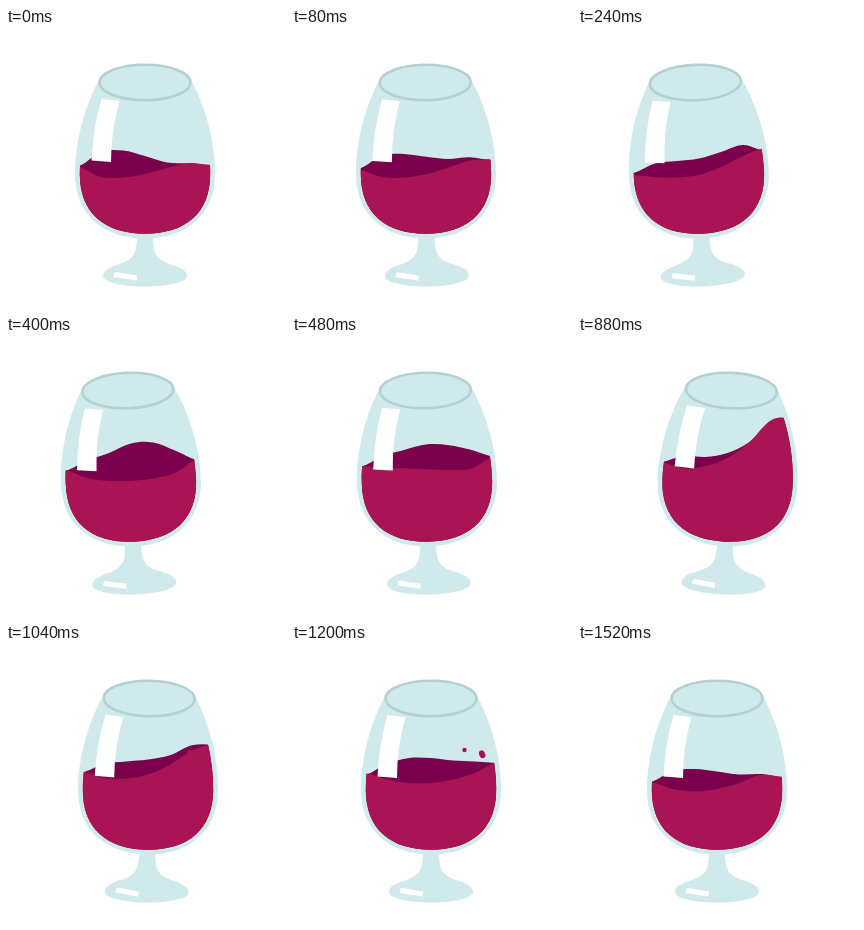
An HTML page with a canvas for the animation above (1.6 s loop, 280x280 px).

```html
<!DOCTYPE html>
<html lang="en">
<head>
<meta charset="utf-8">
<title>Swirling wine</title>
<style>
html, body { margin: 0; width: 100%; height: 100%; overflow: hidden; background: #fff; }
canvas { display: block; width: 100vw; height: 100vh; }
</style>
</head>
<body>
<canvas id="stage"></canvas>
<script>
const canvas = document.getElementById('stage');
const ctx = canvas.getContext('2d');
const SIZE = 280, LOOP = 1600, STEP = 80;
const GLASS = '#d0eaeb', RIM = '#b4d1d2', WINE = '#a91554', DARK = '#7a004c';
const PIVOT_Y = 148, GLASS_HEIGHT = 193;

// [time, sideways shift of the bowl, lean of rim against foot]
const SWAY = [
  [0, 0, 0], [80, -5, -1.5], [160, -12, -5], [240, -18, -7.5], [320, -24, -8.5],
  [400, -14, -6.5], [480, -4, -3.5], [560, 6, 0], [640, 11, 3.5], [720, 15, 7],
  [800, 17, 9], [880, 10.5, 8], [960, 6, 5], [1040, 3, 2.5], [1120, 1, 0.7],
  [1200, 0, 0], [1600, 0, 0]
];

// [time, seven heights of the far edge, seven heights of the near edge]
const WAVES = [
  [0, 138, 124, 122.5, 128, 134.5, 135.5, 137, 139, 149, 149.5, 146, 140, 135, 137],
  [240, 145, 135.5, 133, 130.5, 124, 117, 123, 147, 149, 149.5, 147, 139, 128, 120],
  [400, 135, 124.5, 117, 107.5, 106.5, 114.5, 124, 134, 142, 145, 145, 142.5, 137, 123],
  [640, 122, 111, 107, 110, 114.5, 112.5, 114, 122, 111, 107, 110, 117, 124, 117],
  [880, 126, 120, 121, 117, 106, 85, 82, 126, 132.5, 130, 122, 106, 84, 82],
  [1200, 131, 120, 114, 114, 116.5, 117.5, 119, 129, 135.5, 139, 139, 135.5, 129, 118],
  [1520, 138, 127, 125, 127.5, 130.5, 130, 133, 138, 145, 147.5, 145, 139, 131, 133]
];
WAVES.push([LOOP, ...WAVES[0].slice(1)]);

function sample(keys, t) {
  let i = 1;
  while (i < keys.length - 1 && keys[i][0] < t) i++;
  const a = keys[i - 1], b = keys[i];
  const k = (t - a[0]) / (b[0] - a[0]);
  return a.slice(1).map((v, n) => v + (b[n + 1] - v) * k);
}

function fill(color, trace) {
  ctx.beginPath();
  trace();
  ctx.fillStyle = color;
  ctx.fill();
}

function bowl(inset) {
  const w = 70 - inset, top = 46 - inset, bottom = 210.5 - inset;
  ctx.moveTo(-top, 52);
  ctx.bezierCurveTo(-top - 14, 78, -w, 112, -w, 146);
  ctx.bezierCurveTo(-w, 186, -42 + inset / 2, bottom, 0, bottom);
  ctx.bezierCurveTo(42 - inset / 2, bottom, w, 186, w, 146);
  ctx.bezierCurveTo(w, 112, top + 14, 78, top, 52);
  ctx.closePath();
}

function foot() {
  ctx.moveTo(-8, 206);
  ctx.bezierCurveTo(-8, 226, -11, 231, -25, 236);
  ctx.bezierCurveTo(-36, 239, -42, 243, -42, 248);
  ctx.bezierCurveTo(-42, 254, -24, 258.5, 0, 258.5);
  ctx.bezierCurveTo(24, 258.5, 42, 254, 42, 248);
  ctx.bezierCurveTo(42, 243, 36, 239, 25, 236);
  ctx.bezierCurveTo(11, 231, 8, 226, 8, 206);
  ctx.closePath();
}

// Smooth curve through evenly spaced heights, closed below the bowl.
function surface(heights) {
  const gap = 22, last = heights.length - 1;
  const y = i => heights[Math.max(0, Math.min(last, i))];
  const x = i => (i - last / 2) * gap;
  ctx.moveTo(x(0) - 8, 230);
  ctx.lineTo(x(0) - 8, y(0) + 3);
  ctx.lineTo(x(0), y(0));
  for (let i = 0; i < last; i++) {
    ctx.bezierCurveTo(
      x(i) + gap / 3, y(i) + (y(i + 1) - y(i - 1)) / 6,
      x(i + 1) - gap / 3, y(i + 1) - (y(i + 2) - y(i)) / 6,
      x(i + 1), y(i + 1));
  }
  ctx.lineTo(x(last) + 8, y(last) + 3);
  ctx.lineTo(x(last) + 8, 230);
  ctx.closePath();
}

function highlights() {
  ctx.moveTo(-43.5, 71);
  ctx.lineTo(-25.5, 73);
  ctx.quadraticCurveTo(-34, 102, -34, 134);
  ctx.lineTo(-53.5, 132.5);
  ctx.quadraticCurveTo(-52, 100, -43.5, 71);
  ctx.moveTo(-30, 244);
  ctx.lineTo(-8, 247.5);
  ctx.lineTo(-8.5, 252.5);
  ctx.lineTo(-31.5, 249);
  ctx.closePath();
}

function drops(t) {
  if (t < 960 || t > 1240) return;
  const s = (t - 1200) / 240;
  const fall = 14 * s + 26 * s * s;
  fill(WINE, () => ctx.arc(33.5 - 12 * s, 106 + fall, 2.2, 0, Math.PI * 2));
  fill(WINE, () => ctx.ellipse(51.2 - 3 * s, 110.3 + fall, 3, 4, -0.4, 0, Math.PI * 2));
}

function draw(t) {
  const [shift, lean] = sample(SWAY, t);
  const wave = sample(WAVES, t);
  const angle = lean / GLASS_HEIGHT;
  const turn = a => {
    ctx.translate(0, PIVOT_Y);
    ctx.rotate(a);
    ctx.translate(0, -PIVOT_Y);
  };

  ctx.setTransform(canvas.width / SIZE, 0, 0, canvas.height / SIZE, 0, 0);
  ctx.fillStyle = '#fff';
  ctx.fillRect(0, 0, SIZE, SIZE);
  ctx.translate(139 + shift, 0);
  turn(angle);

  fill(GLASS, foot);
  fill(GLASS, () => bowl(0));
  ctx.beginPath();
  ctx.ellipse(0, 54.5, 45.5, 17.7, 0, 0, Math.PI * 2);
  ctx.fillStyle = GLASS;
  ctx.fill();
  ctx.strokeStyle = RIM;
  ctx.lineWidth = 2.6;
  ctx.stroke();

  // The wine stays level while the bowl around it tilts.
  ctx.save();
  ctx.beginPath();
  bowl(4.8);
  ctx.clip();
  turn(-angle);
  fill(DARK, () => surface(wave.slice(0, 7)));
  fill(WINE, () => surface(wave.slice(7)));
  drops(t);
  ctx.restore();

  fill('#fff', highlights);
}

function resize() {
  const ratio = window.devicePixelRatio || 1;
  canvas.width = Math.round(innerWidth * ratio);
  canvas.height = Math.round(innerHeight * ratio);
}

function frame() {
  const t = performance.now() % LOOP;
  draw(Math.floor(t / STEP) * STEP);
  requestAnimationFrame(frame);
}

addEventListener('resize', resize);
resize();
frame();
</script>
</body>
</html>
```
